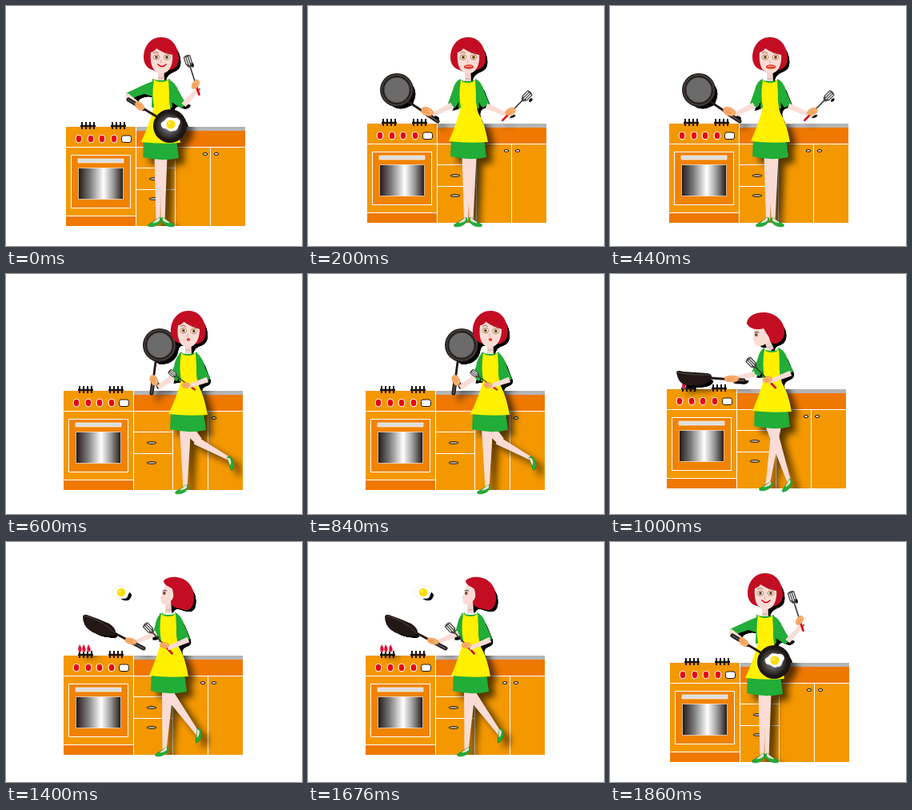
An HTML page for the animation above (1.99 s loop, 370 by 300 pixels).

```html
<!DOCTYPE html>
<html lang="en">
<head>
<meta charset="utf-8">
<title>Cooking</title>
<style>
html, body { margin: 0; width: 100%; height: 100%; overflow: hidden; background: #fff; }
svg { display: block; width: 370px; height: 300px; }
.pose { visibility: hidden; animation: 1990ms step-end infinite; }
.serve { animation-name: serve; }
.greet { animation-name: greet; }
.rest { animation-name: rest; }
.fry { animation-name: fry; }
.toss { animation-name: toss; }
@keyframes serve { 0%, 93.4673% { visibility: visible } 10.0503%, 100% { visibility: hidden } }
@keyframes greet { 0%, 30.1508%, 100% { visibility: hidden } 10.0503% { visibility: visible } }
@keyframes rest { 0%, 50.2513%, 100% { visibility: hidden } 30.1508% { visibility: visible } }
@keyframes fry { 0%, 70.3518%, 100% { visibility: hidden } 50.2513% { visibility: visible } }
@keyframes toss { 0%, 93.4673%, 100% { visibility: hidden } 70.3518% { visibility: visible } }
</style>
</head>
<body>
<svg id="stage" viewBox="0 0 370 300">
  <defs>
    <linearGradient id="glass">
      <stop offset="0" stop-color="#231815"/><stop offset=".25" stop-color="#777"/>
      <stop offset=".56" stop-color="#fff"/><stop offset=".78" stop-color="#999"/>
      <stop offset="1" stop-color="#231815"/>
    </linearGradient>
    <radialGradient id="iron">
      <stop offset="0" stop-color="#999"/><stop offset=".5" stop-color="#555"/><stop offset="1" stop-color="#1c1714"/>
    </radialGradient>
    <filter id="hard" x="-20%" y="-20%" width="140%" height="140%">
      <feGaussianBlur in="SourceAlpha" stdDeviation="3"/>
      <feOffset dx="5" dy="5"/>
      <feComponentTransfer><feFuncA type="linear" slope="20" intercept="-14.5"/></feComponentTransfer>
    </filter>
    <filter id="soft" x="-20%" y="-20%" width="140%" height="140%">
      <feGaussianBlur in="SourceAlpha" stdDeviation="4.5"/>
      <feOffset dx="8" dy="7"/>
      <feComponentTransfer><feFuncA type="linear" slope=".65"/></feComponentTransfer>
    </filter>
    <g id="burner" fill="none" stroke="#1c1714" stroke-width="2">
      <path d="M0 5H19" stroke-width="2.5"/><path d="M2 0V9M7 0V9M12 0V9M17 0V9"/>
    </g>
    <g id="knob"><ellipse rx="4.4" ry="5.2" fill="#fff"/><ellipse rx="3.3" ry="4.2" fill="#e60012"/></g>
    <ellipse id="pull" rx="6" ry="1.4" fill="#c9b9a0" stroke="#231815"/>
    <ellipse id="catch" rx="2.8" ry="1.5" fill="#e8dccb" stroke="#231815"/>
    <g id="kitchen">
      <path d="M0 0H87V124H0ZM88 0H224V124H88Z" fill="#f39800"/>
      <path d="M88 0H224V5H88Z" fill="#b5b5b6"/>
      <path d="M88 5H224V25H88ZM0 112H87V124H0Z" fill="#ee7800"/>
      <path d="M0 25.5H224M0 111.5H87M87.5 0V124M88 51.5H136M88 78.5H136M136.5 26V124M180.5 26V124" stroke="#fff" fill="none"/>
      <path d="M6.5 35.5H80.5V101.5H6.5Z" fill="#f08300" stroke="#fff"/>
      <path d="M15 40H72V45H15Z" fill="#dcdddd" stroke="#fff" stroke-width=".6"/>
      <path d="M15.5 51.5H71.5V90.5H15.5Z" fill="url(#glass)" stroke="#fff" stroke-width=".6"/>
      <use href="#burner" x="18" y="-6"/><use href="#burner" x="56" y="-6"/>
      <use href="#knob" x="16" y="15"/><use href="#knob" x="31" y="15"/>
      <use href="#knob" x="45" y="15"/><use href="#knob" x="60" y="15"/>
      <rect x="69.5" y="11" width="12" height="8.5" rx="2.5" fill="#fff" stroke="#231815"/>
      <use href="#pull" x="110" y="65"/><use href="#pull" x="110" y="90"/>
      <use href="#catch" x="174" y="34"/><use href="#catch" x="188" y="34"/>
    </g>
    <g id="eye">
      <ellipse rx="4" ry="3.2" fill="#fff" stroke="#a66b45" stroke-width=".8"/>
      <circle r="2.4" fill="#b28b5a"/><circle r="1" fill="#231815"/>
    </g>
    <g id="face">
      <path d="M0-21C-14-21-22-9-22 4C-22 13-17 18-11 20H11C18 18 22 14 22 5C21-9 14-21 0-21Z" fill="#c30d23"/>
      <path d="M-13-2C-14 9-12 24 0 24.5C12 24 15 10 14 1C7 0 0-3-6-7C-8-4-10-3-13-2Z" fill="#f9dcd5"/>
      <path d="M-10-1Q-6-4-3-1M4-1Q8-4 11-1" fill="none" stroke="#8f4a32" stroke-width=".8"/>
      <use href="#eye" x="-6" y="4"/><use href="#eye" x="7" y="4"/>
      <path d="M0 7L-1 11H1" fill="none" stroke="#dda994" stroke-width=".8"/>
    </g>
    <g id="pan">
      <circle r="21" fill="#231d1a"/><circle r="18.7" fill="none" stroke="#4b4643" stroke-width="1.5"/>
      <circle r="16" fill="#6c6b6b" stroke="#3c3836"/>
    </g>
    <g id="egg">
      <path d="M-12 1C-13-4-8-3-6-7C-2-11 2-7 6-8C12-8 13-2 10 1C8 5 9 8 3 8C-3 10-4 5-8 5Q-11 5-12 1Z" fill="#fff" stroke="#e4e1de" stroke-width=".5"/>
      <circle r="5.5" fill="#ffdb00"/><circle cx="-1.5" cy="-1.5" r="2" fill="#fff35c"/>
    </g>
    <g id="spatula">
      <path d="M0 0V-25" stroke="#3e3a39" stroke-width="1.8"/>
      <path d="M0 16V1" stroke="#d7000f" stroke-width="3" stroke-linecap="round"/>
      <path d="M-2-24L-5-29V-40Q0-43 5-40V-29L2-24Z" fill="#4a4645"/>
      <path d="M-2.8-39V-29M0-39V-27M2.8-39V-29" stroke="#fff" stroke-width="1.4"/>
    </g>
    <g id="hand">
      <path d="M-8-2C-5-6 3-6 7-3C10 0 7 5 2 5C-3 6-9 4-8-2Z" fill="#f8b16c" stroke="#e98142" stroke-width=".7"/>
      <path d="M-6 0L1-2M-5 2L3 1" stroke="#e98142" stroke-width=".8"/>
    </g>
    <g id="shoe">
      <path d="M6-8C2-5-3-2-8 1Q-10 4-5 4C1 4 5 1 8-3Q9-7 6-8Z" fill="#22ac38" stroke="#178a2c" stroke-width=".5"/>
      <path d="M6-8Q1-4-3-1Q2 0 6-4Z" fill="#f9dcd5"/>
    </g>
  </defs>
</svg>
<script>
const SKIN = '#f9dcd5', HAIR = '#c30d23', GREEN = '#22ac38', YELLOW = '#fff100', BLACK = '#231815';

const shape = (d, fill) => `<path d="${d}" fill="${fill}"/>`;
const line = (d, color, width) =>
  `<path d="${d}" fill="none" stroke="${color}" stroke-width="${width}" stroke-linecap="round" stroke-linejoin="round"/>`;
const part = (id, x, y, turn = 0, sx = 1, sy = sx) =>
  `<use href="#${id}" transform="translate(${x} ${y}) rotate(${turn}) scale(${sx} ${sy})"/>`;

// Tapered limb between two points
function limb(x1, y1, w1, x2, y2, w2, color = SKIN) {
  const a = Math.atan2(y2 - y1, x2 - x1), nx = -Math.sin(a) / 2, ny = Math.cos(a) / 2;
  return shape(`M${x1 + nx * w1} ${y1 + ny * w1}L${x2 + nx * w2} ${y2 + ny * w2}L${x2 - nx * w2} ${y2 - ny * w2}L${x1 - nx * w1} ${y1 - ny * w1}Z`, color);
}
// Thin stem that ends in a thick grip
function handle(x1, y1, x2, y2) {
  const grip = `M${x1 * .35 + x2 * .65} ${y1 * .35 + y2 * .65}L${x2} ${y2}`;
  return line(`M${x1} ${y1}L${x2} ${y2}`, BLACK, 2.8) + line(grip, BLACK, 5) + line(grip, '#4c5054', 2);
}
// Dress and apron hung from the middle of the neckline
const dress = (x, y, skirt, lean = 0) =>
  `<g transform="translate(${x} ${y})">` +
  shape(`M${lean - 22} ${skirt - 2}L${lean - 23} ${skirt + 18}Q${lean} ${skirt + 24} ${lean + 22} ${skirt + 19}L${lean + 19} ${skirt - 4}Z`, GREEN) +
  shape('M-11 0Q0 4 11 0L14 36H-12Z', GREEN) +
  shape(`M-9 0Q-7 4 0 4Q7 4 9 0L10 18Q9 30 13 42Q${lean + 20} 55 ${lean + 24} ${skirt}Q${lean} ${skirt + 2} ${lean - 25} ${skirt - 1}Q-14 55-9 34Q-12 20-9 0Z`, YELLOW) +
  '</g>';
const neck = (x, y, lean = 0) =>
  limb(x, y, 7, x + lean, y + 13, 8, '#f4d2ca') + line(`M${x + lean - 3} ${y + 9}h6`, '#b8aaa5', 1);
const flame = (x, y) => `<path d="M${x} ${y}q-2-4 1-9q4 6 2 9Z" fill="#e60033" stroke="#f5a9a5" stroke-width=".5"/>`;
const profile = (face, hair, x, y) => shape(face, SKIN) + shape(hair, HAIR) +
  line(`M${x - 2} ${y - 3}q3-2 5 0`, BLACK, .8) +
  `<ellipse cx="${x}" cy="${y}" rx="1.8" ry="2.4" fill="#9f7049"/><circle cx="${x - .7}" cy="${y}" r=".9" fill="${BLACK}"/>`;

const poses = [
  {
    name: 'serve', at: [75, 151],
    art: limb(190, 188, 9, 190, 268, 5) + limb(197, 188, 9, 196, 268, 5) +
      part('shoe', 186, 272) + part('shoe', 202, 272, 0, -1, 1) +
      shape('M186 93Q175 97 167 101L150 109L154 116L173 110L186 114Z', GREEN) +
      shape('M203 92Q212 95 216 107L225 122L219 128L204 118Z', GREEN) +
      neck(194, 81) + dress(194, 91, 80) +
      limb(150, 111, 6, 166, 123, 5) + limb(222, 124, 7, 239, 105, 5) +
      handle(188, 138, 153, 117) + part('hand', 167, 125, 40, .8) +
      '<circle cx="205" cy="150" r="21" fill="#1c1714"/><circle cx="204" cy="150" r="17.5" fill="url(#iron)"/>' +
      part('egg', 206, 148) + part('spatula', 237, 97, -18, .9) + part('hand', 237, 98, -60, .75) +
      part('face', 194, 60) + line('M190 73Q195 78 200 73', '#d7000f', 1.6)
  },
  {
    name: 'greet', at: [74, 147],
    art: limb(198, 188, 11, 197.5, 268, 5) + limb(205, 188, 11, 204, 268, 5) +
      part('shoe', 191, 272) + part('shoe', 209, 272, 0, -1, 1) +
      shape('M191 91Q184 93 181 105L175 122L184 127L194 111Z', GREEN) +
      shape('M209 91Q217 94 220 106L227 123L218 127L207 112Z', GREEN) +
      neck(200, 82) + dress(200, 92, 78, 1) +
      limb(180, 124, 7, 154, 137, 5) + limb(223, 125, 7, 249, 136, 5) +
      handle(126, 120, 162, 144) + part('pan', 111, 105) + part('hand', 149, 132, 20, .95) +
      part('spatula', 253, 133, 45, .87) + part('hand', 253, 132, -25, .8) +
      part('face', 200, 60) +
      '<ellipse cx="201" cy="76" rx="6.2" ry="2.8" fill="#e83828"/><path d="M197 75.5H205" stroke="#f6b9a5"/>'
  },
  {
    name: 'rest', at: [72, 146],
    art: limb(224, 194, 14, 224, 268, 5) + limb(228, 194, 13, 241, 209, 10) + limb(237, 208, 10, 281, 232, 4) +
      part('shoe', 220, 271) + part('shoe', 282, 237, -75, .95) +
      shape('M220 97Q212 102 210 116L204 129L214 134L223 116Z', GREEN) +
      shape('M237 97Q246 104 249 117L255 131L245 137L234 117Z', GREEN) +
      neck(228, 86) + dress(228, 98, 78) +
      limb(209, 129, 7, 190, 142, 6) +
      handle(187, 110, 182, 149) + part('pan', 192, 89) + part('hand', 185, 133, 65, .85) +
      part('spatula', 227, 138, -54, .7) + limb(252, 132, 7, 226, 141, 5) + part('hand', 225, 139, 0, .65) +
      part('face', 228, 67, 3) + '<ellipse cx="228" cy="82" rx="2.4" ry="1.8" fill="#e83828"/>'
  },
  {
    name: 'fry', at: [71, 144],
    art: flame(91, 143) +
      limb(208, 190, 12, 197, 264, 5) + limb(201, 190, 13, 224, 260, 5) +
      part('shoe', 195, 267) + part('shoe', 222, 266, -25) +
      shape('M193 92Q187 95 184 108L177 123L187 128L196 111Z', GREEN) +
      shape('M210 92Q219 95 222 107L229 122L219 128L207 113Z', GREEN) +
      neck(196, 82, 5) + dress(202, 94, 78, 1) +
      limb(181, 125, 7, 157, 130, 5) + handle(126, 130, 167, 133) + part('hand', 152, 131, 0, 1.1, .75) +
      shape('M83 122Q86 120 91 122L122 124Q128 125 127 130Q123 139 110 139H98Q85 139 83 122Z', BLACK) +
      line('M85 123Q102 127 124 126', '#595757', .8) +
      part('spatula', 197, 132, -44, .88) + limb(226, 124, 7, 198, 135, 5) + part('hand', 197, 132, -10, .7) +
      profile('M181 66C179 73 180 78 178 81L180 83C179 88 184 91 188 90C194 89 201 83 202 76L192 64Z',
        'M171 62C171 54 180 48 192 48C206 48 217 58 218 70C219 80 213 87 205 87C198 86 201 80 196 75L192 68C186 70 175 70 171 62Z', 183, 76)
  },
  {
    name: 'toss', at: [72, 142],
    art: [91, 96, 102].map(x => flame(x, 137)).join('') +
      limb(202, 185, 14, 198, 260, 5) + limb(201, 186, 13, 240, 240, 5) +
      part('shoe', 195, 264) + part('shoe', 241, 243, -50, .95) +
      shape('M196 88Q189 91 187 102L184 113L191 119L199 107Z', GREEN) +
      shape('M211 88Q219 91 223 104L230 121L221 127L208 111Z', GREEN) +
      neck(203, 76) + dress(203, 89, 79, 1) +
      limb(188, 114, 7, 160, 126, 5) + handle(136, 114, 172, 133) + part('hand', 156, 124, 15, .9, .7) +
      shape('M96 93Q97 90 101 91Q116 96 129 102Q138 108 137 114Q136 119 127 117Q111 116 104 110Q96 104 96 93Z', BLACK) +
      line('M98 92Q119 97 135 113', '#595757', .7) +
      part('egg', 144, 63, 0, .95) +
      part('spatula', 198, 129, -43, .88) + limb(228, 122, 7, 202, 133, 5) + part('hand', 198, 129, 0, .7) +
      profile('M199 53C197 60 195 65 192 70L194 71C193 75 195 79 199 78C206 78 211 73 211 66L208 52Z',
        'M197 49C198 45 208 43 214 44C228 46 236 58 235 71C235 81 229 88 220 84C212 83 206 80 206 74C211 69 209 64 208 59C206 56 198 55 197 49Z', 198, 64)
  }
];

document.getElementById('stage').insertAdjacentHTML('beforeend', poses.map(({ name, at: [x, y], art }) => `
  <clipPath id="${name}-low"><path d="M${x} ${y}h224v124h-224Z"/></clipPath>
  <clipPath id="${name}-high"><path d="M0 0H370V${y}H0Z"/></clipPath>
  <g class="pose ${name}">
    <use href="#kitchen" x="${x}" y="${y}"/>
    <g clip-path="url(#${name}-low)"><use href="#${name}-art" filter="url(#soft)"/></g>
    <g clip-path="url(#${name}-high)"><use href="#${name}-art" filter="url(#hard)"/></g>
    <g id="${name}-art">${art}</g>
  </g>`).join(''));
</script>
</body>
</html>
```
